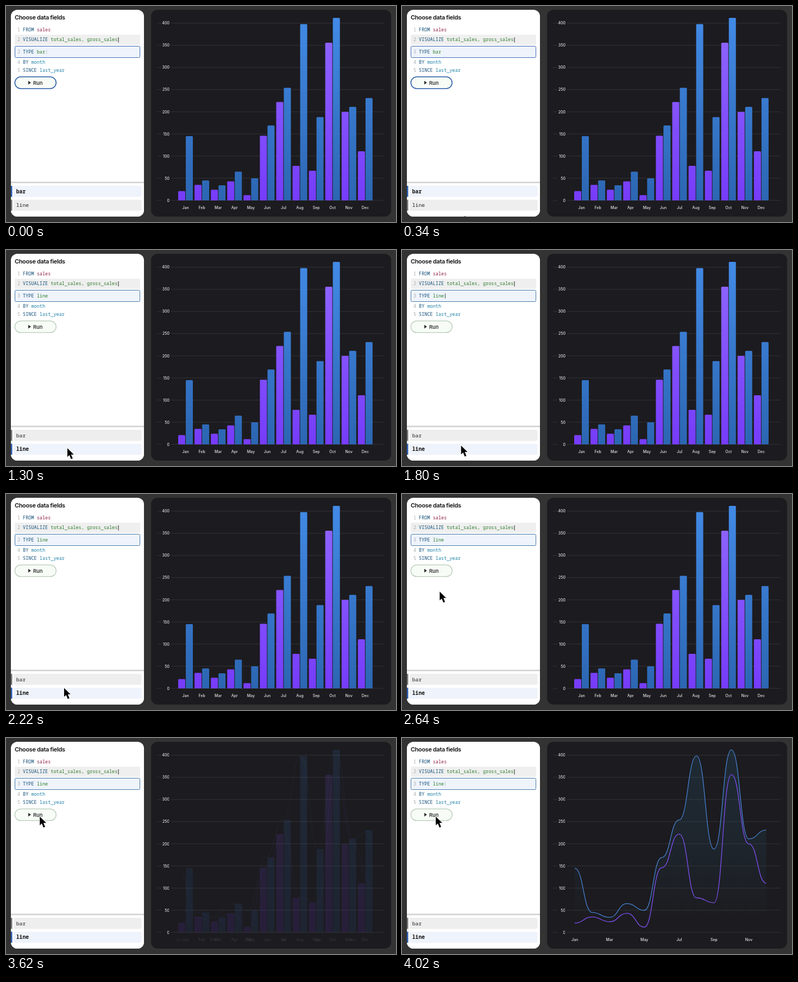
An HTML page for the animation above (4040 ms loop, 718 px wide and 400 px high).

```html
<!DOCTYPE html>
<html lang="en">
<head>
<meta charset="utf-8">
<title>Query to chart</title>
<style>
  html, body { margin: 0; width: 100%; height: 100%; overflow: hidden; background: #333; }
  svg { display: block; width: 100vw; height: 100vh; }
  text { white-space: pre; }
  .ui { font-family: Inter, "Open Sans", sans-serif; }
  .code { font: 500 8.55px "Noto Sans Mono", "DejaVu Sans Mono", monospace; }
  .item { font: 500 9.7px "Noto Sans Mono", "DejaVu Sans Mono", monospace; fill: #222; }
  .item.on { font-weight: 700; fill: #111; }
  .tick { font-size: 7px; font-weight: 500; fill: #e6e6e8; }
  .num { fill: #a9abad; }
  .key { fill: #14507a; }
  .tbl { fill: #8d1f48; }
  .col { fill: #2c7a2a; }
  .arg { fill: #1d80a6; }
</style>
</head>
<body>
<svg id="stage" viewBox="0 0 718 400">
  <defs>
    <linearGradient id="blue" gradientUnits="userSpaceOnUse" x1="0" y1="22" x2="0" y2="360">
      <stop offset="0" stop-color="#428ae6"/><stop offset="1" stop-color="#2c66b2"/>
    </linearGradient>
    <linearGradient id="purple" gradientUnits="userSpaceOnUse" x1="0" y1="22" x2="0" y2="360">
      <stop offset="0" stop-color="#9068ff"/><stop offset="1" stop-color="#763cfa"/>
    </linearGradient>
    <linearGradient id="haze" gradientUnits="userSpaceOnUse" x1="0" y1="22" x2="0" y2="345">
      <stop offset="0" stop-color="#2a6c90" stop-opacity=".2"/>
      <stop offset=".55" stop-color="#2a6c90" stop-opacity=".12"/>
      <stop offset="1" stop-color="#2a6c90" stop-opacity="0"/>
    </linearGradient>
    <linearGradient id="shade" x1="0" y1="0" x2="0" y2="1">
      <stop offset="0" stop-color="#000" stop-opacity="0"/><stop offset="1" stop-color="#000" stop-opacity=".24"/>
    </linearGradient>
    <clipPath id="card"><rect x="9" y="7" width="245" height="383" rx="12"/></clipPath>
    <clipPath id="axisClip"><rect id="axisEdge" x="270" y="10" width="40" height="370"/></clipPath>
  </defs>

  <rect width="718" height="400" fill="#333"/>
  <rect x="267" y="7" width="442" height="383" rx="12" fill="#1c1b1f"/>
  <g id="grid"></g>
  <g id="bars"></g>
  <g id="lines"></g>

  <g clip-path="url(#card)">
    <rect x="9" y="7" width="245" height="383" fill="#fff"/>
    <text class="ui" x="16" y="25" font-size="11" font-weight="600" letter-spacing="-.37" fill="#111">Choose data fields</text>
    <rect x="16" y="53" width="231" height="19" rx="2" fill="#efefef"/>
    <rect id="field" x="16.5" y="74.5" width="230" height="21" rx="2" fill="#eff4fc"/>
    <g id="query"></g>
    <rect x="206.5" y="58" width="1" height="9.5" fill="#222"/>
    <rect id="caret" y="80.5" width="1" height="9" fill="#2b4a3a"/>
    <rect id="run" x="16.3" y="131.3" width="76" height="21.6" rx="10.8" fill="#f7fdf6"/>
    <path d="M41 138.5l5 3.5l-5 3.5z" fill="#333"/>
    <text class="ui" x="50" y="145.5" font-size="9.4" font-weight="600" fill="#333">Run</text>
    <rect x="9" y="324" width="245" height="4" fill="url(#shade)"/>
    <g id="menu"></g>
    <path id="pointer" d="M0 0V16.2L3.7 12.8L6.8 20.2L9.8 18.9L6.8 11.7H11.8Z" fill="#000" stroke="#fff" stroke-width="1.2" paint-order="stroke"/>
  </g>
</svg>
<script>
const LOOP = 4040, PICK = 1180;
const months = "Jan Feb Mar Apr May Jun Jul Aug Sep Oct Nov Dec".split(" ");
const series = {
  purple: [21, 35, 24, 43, 12, 146, 222, 78, 67, 356, 200, 111],
  blue: [145, 45, 34, 65, 50, 169, 254, 398, 188, 412, 211, 231]
};
const $ = id => document.getElementById(id);
const yOf = v => 360 - v * 0.8205;
const barX = i => 330.5 + i * 30.08;
const lineX = i => 318 + i * 32.05;

function add(parent, tag, attrs, text) {
  const el = document.createElementNS("http://www.w3.org/2000/svg", tag);
  for (const k in attrs) el.setAttribute(k, attrs[k]);
  if (text !== undefined) el.textContent = text;
  parent.appendChild(el);
  return el;
}
function set(el, attrs) {
  for (const k in attrs) el.setAttribute(k, attrs[k]);
}

// Axis
const ticks = add($("grid"), "g", { "clip-path": "url(#axisClip)" });
for (let v = 0; v <= 400; v += 50) {
  const y = yOf(v);
  for (const [x, w] of [[278, 8], [304, 393]])
    add($("grid"), "rect", { x, y: y - 0.5, width: w, height: 1, fill: "#333337" });
  add(ticks, "text", { class: "ui tick", x: 301, y: y + 2.6, "text-anchor": "end" }, v);
}
function monthLabels(parent, at, step) {
  for (let i = 0; i < 12; i += step)
    add(parent, "text", { class: "ui tick", x: at(i), y: 375.6, "text-anchor": "middle" }, months[i]);
}

// Bars
months.forEach((_, i) => {
  for (const [name, dx] of [["purple", -13.5], ["blue", 0.5]]) {
    const x = barX(i) + dx, y = yOf(series[name][i]);
    add($("bars"), "path", {
      d: `M${x} 360V${y + 1.5}q0 -1.5 1.5 -1.5h10q1.5 0 1.5 1.5V360z`, fill: `url(#${name})`
    });
  }
});
monthLabels($("bars"), barX, 1);

// Curves with level tangents at every point
function curve(values) {
  return values.map((v, i) => {
    const x = lineX(i), y = yOf(v);
    if (!i) return `M${x} ${y}`;
    const mid = x - 32.05 / 2;
    return `C${mid} ${yOf(values[i - 1])} ${mid} ${y} ${x} ${y}`;
  }).join("");
}
const haze = add($("lines"), "path", {
  d: curve(series.blue) + `V360H${lineX(0)}z`, fill: "url(#haze)"
});
for (const [name, stroke] of [["blue", "#4680d0"], ["purple", "#8050f4"]])
  add($("lines"), "path", { d: curve(series[name]), fill: "none", stroke, "stroke-width": 1.3 });
monthLabels($("lines"), lineX, 2);

// Query
let kind;
[
  [47.2, "FROM", "sales", "tbl"],
  [65.2, "VISUALIZE", "total_sales, gross_sales", "col"],
  [88, "TYPE", "bar", "col"],
  [107.2, "BY", "month", "arg"],
  [122, "SINCE", "last_year", "arg"]
].forEach(([y, key, value, cls], i) => {
  add($("query"), "text", { class: "code num", x: 21, y }, i + 1);
  const row = add($("query"), "text", { class: "code", x: 31, y });
  add(row, "tspan", { class: "key" }, key + " ");
  const part = add(row, "tspan", { class: cls }, value);
  if (key === "TYPE") kind = part;
});

// Menu
add($("menu"), "rect", { x: 9, y: 328, width: 245, height: 62, fill: "#fff" });
const items = ["bar", "line"].map((label, i) => {
  const y = 333 + i * 25.7;
  return {
    strip: add($("menu"), "rect", { x: 9, y, width: 2.5, height: 20.5 }),
    box: add($("menu"), "rect", { x: 14, y, width: 235.5, height: 20.5, rx: 3 }),
    text: add($("menu"), "text", { x: 18.8, y: y + 13.6 }, label)
  };
});

const clamp = v => Math.max(0, Math.min(1, v));
const ramp = (t, a, b) => clamp((t - a) / (b - a));
const inOut = p => p < 0.5 ? 4 * p ** 3 : 1 - 4 * (1 - p) ** 3;
const outCubic = p => 1 - (1 - p) ** 3;

// Rows: start, end, x, y, easing
const path = [
  [300, 800, 112.3, 369, outCubic],
  [800, 1300, 113, 367, p => p],
  [1300, 1640, 109.5, 363.5, inOut],
  [1640, 2180, 107, 359.5, p => p],
  [2180, 2880, 62.3, 147, inOut],
  [2880, 3500, 62.2, 145.5, p => p]
];
function pointerAt(t) {
  let x = 116, y = 394;
  for (const [a, b, tx, ty, ease] of path) {
    const p = ease(ramp(t, a, b));
    x += (tx - x) * p;
    y += (ty - y) * p;
  }
  return [x, y];
}

// Rows: time, opacity
const blink = [
  [0, 0.25], [80, 0], [480, 0], [560, 1], [1000, 1], [1080, 0], [1480, 0], [1560, 1], [2020, 1],
  [2100, 0], [2780, 0], [2860, 1], [3300, 1], [3380, 0], [3920, 0], [4040, 0.3]
];
function caretAt(t) {
  const i = blink.findIndex(k => k[0] > t);
  const [t0, a] = blink[i - 1], [t1, b] = blink[i];
  return a + (b - a) * ramp(t, t0, t1);
}

function draw(t) {
  const picked = t >= PICK ? 1 : 0;
  kind.textContent = picked ? "line" : "bar";
  set($("caret"), { x: picked ? 79 : 74.3, opacity: caretAt(t) });
  set($("field"), { stroke: picked ? "#4377a8" : "#3a66b4" });
  set($("run"), picked ? { stroke: "#b5c9b6", "stroke-width": 1.2 } : { stroke: "#2458a4", "stroke-width": 1.5 });
  items.forEach(({ strip, box, text }, i) => {
    const on = i === picked;
    set(strip, { fill: on ? "#2a5fb8" : "#777" });
    set(box, { fill: on ? "#eff3fb" : "#eeeeee" });
    set(text, { class: on ? "item on" : "item" });
  });
  const [x, y] = pointerAt(t);
  set($("pointer"), { transform: `translate(${x} ${y})`, visibility: t < 300 ? "hidden" : "visible" });

  set($("bars"), { opacity: 1 - ramp(t, 3480, 3640) });
  set($("lines"), { opacity: ramp(t, 3600, 3900) });
  set(haze, { opacity: ramp(t, 3700, 4020) });
  set($("axisEdge"), { width: t < 3600 ? 40 : 30.3 });
}

const start = performance.now();
function tick() {
  draw((performance.now() - start) % LOOP);
  requestAnimationFrame(tick);
}
tick();
</script>
</body>
</html>
```
